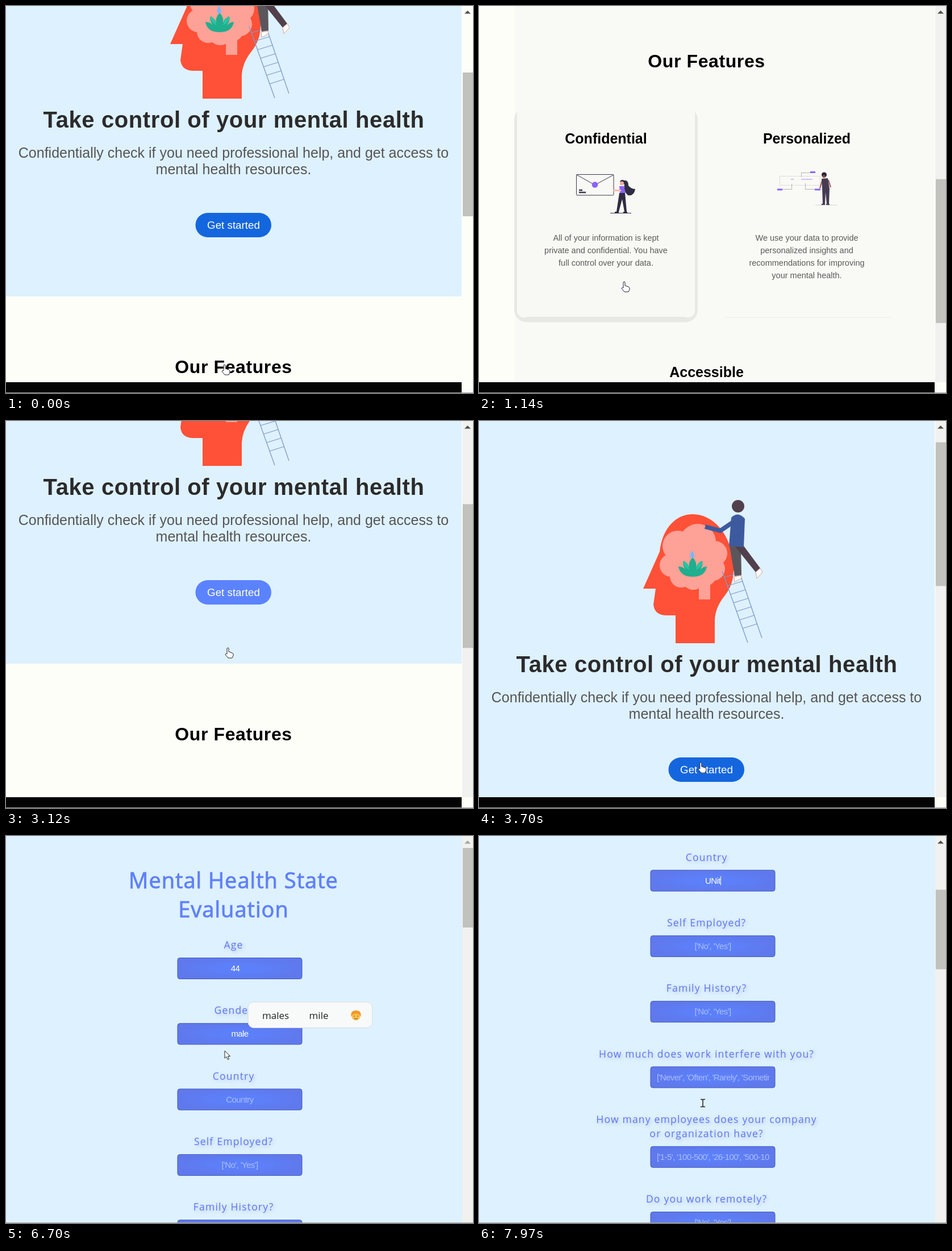
An HTML page that plays this animation: 822x681 px, repeating every 8000 ms.

```html
<!DOCTYPE html>
<html lang="en">
<head>
<meta charset="utf-8">
<style>
  html, body { margin: 0; width: 100%; height: 100%; overflow: hidden; background: #fefef9; }
  svg { display: block; }
  text { font-family: "Liberation Sans", Arial, sans-serif; text-anchor: middle; white-space: pre; }
  .title { font-weight: bold; letter-spacing: .6px; }
  .name { font: bold 25px "Liberation Sans", Arial, sans-serif; }
  .copy { font-size: 14.5px; fill: #5a5a5a; }
  .open { font-family: "Open Sans", sans-serif; }
  .head { font-size: 38px; letter-spacing: 1px; fill: #5f80fa; stroke: #5f80fa; stroke-width: .9px; }
  .label { font-size: 17.5px; letter-spacing: 1.2px; fill: #6274f0; filter: drop-shadow(2px 2px 3px #4466aa55); }
  .entry { font-size: 15px; letter-spacing: -.6px; }
</style>
</head>
<body>
<svg id="stage" width="822" height="681" viewBox="0 0 822 681">
  <defs>
    <radialGradient id="field"><stop offset=".3" stop-color="#5c80fa"/><stop offset="1" stop-color="#5f79ec"/></radialGradient>
  </defs>

  <g id="home">
    <rect width="822" height="681" fill="#fefef9"/>
    <rect id="shade" x="63" width="739" height="662" fill="#f9f9f5"/>
    <g id="homePage">
      <rect y="-278" width="802" height="789" fill="#def1ff"/>
      <path fill="#ff5137" d="M289 67L318 2C330-100 448-80 448 35Q448 60 432 80Q416 100 415 122V163H346V114H330Q309 114 307 95L311 67Z"/>
      <g fill="#fea197">
        <circle cx="338" cy="26" r="20"/><circle cx="350" cy="-8" r="27"/><circle cx="385" cy="-15" r="32"/>
        <circle cx="415" cy="5" r="22"/><circle cx="412" cy="32" r="21"/><circle cx="356" cy="45" r="20"/>
        <circle cx="377" cy="48" r="21"/><circle cx="397" cy="42" r="21"/><rect x="387" y="50" width="20" height="36"/>
        <rect x="340" y="-20" width="75" height="66"/>
      </g>
      <path fill="#1fae8e" d="M351 28Q360 28 364 34Q357 24 360 18Q368 22 370 30Q368 20 376 12Q384 20 382 30Q385 21 393 18Q395 25 389 34Q394 28 401 28Q398 46 376 46Q354 46 351 28Z"/>
      <path fill="#22c9a6" d="M360 18Q368 22 370 34Q359 28 360 18ZM393 18Q385 22 382 34Q394 28 393 18Z"/>
      <path fill="#79b8ff" d="M375 0Q383 12 375 13Q368 12 375 0Z"/>
      <g id="ladder" fill="none" stroke="#7d9aca" stroke-width="1.3"></g>
      <path fill="#5b565c" d="M441-8L461-8L462 43L450 45Z"/>
      <path fill="#51404c" d="M450-8L466-8L495 31L487 38Z"/>
      <path fill="#fff" stroke="#d9a08c" d="M449 46L462 44Q464 50 450 55ZM487 38L495 31L499 38L489 49Z"/>
      <path fill="#3d5a9e" d="M440-8L444-58Q456-70 468-56L466-6Z"/>
      <path fill="none" stroke="#3d5a9e" stroke-width="8" d="M450-52L425-35L398-42"/>
      <circle cx="456" cy="-78" r="11" fill="#51404c"/>

      <text class="title" x="401" y="214" font-size="40" fill="#2b2b2b">Take control of your mental health</text>
      <g font-size="25" fill="#555">
        <text x="400.5" y="267">Confidentially check if you need professional help, and get access to</text>
        <text x="400.5" y="296">mental health resources.</text>
      </g>
      <rect id="button" x="333.5" y="364" width="133.5" height="43" rx="21.5"/>
      <text x="400.5" y="392" font-size="18.75" fill="#fff">Get started</text>
      <text class="title" x="400.5" y="646" font-size="32">Our Features</text>

      <g transform="translate(0 538)">
        <path stroke="#ededE6" d="M77 548H367M433 548H725"/>
        <g id="hover">
          <rect x="62" y="178" width="323" height="378.5" rx="22" fill="#e8e8e6"/>
          <rect x="67" y="177" width="313" height="371" rx="12" fill="#f8f8f4"/>
          <path stroke="#dfe0d4" d="M84 548H364"/>
        </g>
        <text class="name" x="223.5" y="242">Confidential</text>
        <text class="name" x="577" y="242">Personalized</text>
        <text class="name" x="400.5" y="653">Accessible</text>
        <g id="copies"></g>

        <g stroke="#3a3750">
          <rect x="171.5" y="296.500" width="65.500" height="36.500" rx="1.500" fill="none"/>
          <path fill="none" d="M172 297L204 315L237 297M231 364.500H268"/>
          <path stroke-width="2.500" d="M176 324H182M176 328H188"/>
        </g>
        <circle cx="204" cy="314.500" r="5.300" fill="#8a63f7"/>
        <path fill="#2f2c42" d="M248 309Q250 304 256 307Q263 306 263 316Q268 322 275 322Q273 335 262 333Q254 326 256 314Z"/>
        <circle cx="251.500" cy="312" r="3.500" fill="#f3a9a0"/>
        <path fill="#8a63f7" d="M247 317H255L258 329H248Z"/>
        <path stroke="#ffb9ae" stroke-width="3" d="M236 324.500H250"/>
        <path fill="#2f2c42" d="M247 329H257L260 362H256L252 340L246 362H242ZM239 362H246V364.500H239ZM254 362H261V364.500H254Z"/>

        <rect x="529.500" y="299.500" width="71" height="16" fill="none" stroke="#dededc"/>
        <path fill="none" stroke="#b3b3b8" d="M567.500 301V293.500H583M550.500 313V322.500H534M574.500 312V322.500H591"/>
        <path stroke="#8a63f7" stroke-width="3" d="M583 292.500H592M525 323H534M591 323H601"/>
        <path stroke="#a78cf8" d="M549 305H554M567 305H587"/>
        <circle cx="607.500" cy="297" r="4.500" fill="#2f2437"/><circle cx="607" cy="300" r="2.500" fill="#8d4f4b"/>
        <path fill="none" stroke="#9a5b58" stroke-width="2" d="M604 307L600 321M615 306L619 319"/>
        <path fill="#453c52" d="M603 304L614 303L617 322L616 348H612L610 328L609 348H605L604 320ZM603 348H609V350H603ZM611 348H617V350H611Z"/>
        <path stroke="#d5d5d5" d="M592 350.500H630"/>

        <g transform="translate(0 242)" stroke-linejoin="round">
          <path fill="none" stroke="#7168a8" stroke-width="11" d="M374 497L360 483Q345 460 363 446Q378 438 394 448"/>
          <path fill="none" stroke="#b9a9f2" stroke-width="9" d="M374 497L360 483Q345 460 363 446Q378 438 393 447"/>
          <path fill="none" stroke="#e9e3ff" stroke-width="2" d="M365 444Q374 439 384 442"/>
          <path fill="#f7ce5b" stroke="#a08a44" d="M373 498L364 507L390 532Q409 547 430 538L440 528Z"/>
          <path fill="#f3e689" stroke="#8f8448" d="M416 454L446 483Q456 497 449 512Q441 532 420 534Q409 534 400 526L371 500Z"/>
          <path fill="none" stroke="#d9b54a" d="M416 460L442 485Q452 497 445 511Q437 528 420 530Q411 530 402 522L376 500Z"/>
          <circle cx="413" cy="497" r="6" fill="#33355e"/>
          <path stroke="#33355e" stroke-width="5" d="M413 497L426 506"/>
          <path stroke="#9a8be0" stroke-width="5" d="M412 499L423 508"/>
        </g>
      </g>
    </g>
    <rect y="662" width="802" height="18" fill="#040404"/>
  </g>

  <g id="form">
    <rect width="822" height="681" fill="#def1ff"/>
    <g id="formPage">
      <text class="open head" x="400.500" y="92">Mental Health State</text>
      <text class="open head" x="400.500" y="143">Evaluation</text>
      <g id="fields"></g>
      <g id="spinner">
        <rect x="494" y="225" width="16" height="16" fill="#f2f2f2"/>
        <path fill="#444" d="M498 231.500L502 227L506 231.500ZM498 235L502 239.500L506 235Z"/>
      </g>
    </g>
    <g id="tooltip">
      <path fill="#fff" stroke="#666" d="M396.500 292V259.500H574.500V292"/>
      <text class="open" x="485" y="282" font-size="14.800" fill="#444">Please fill out this field.</text>
    </g>
    <g id="suggest">
      <rect x="426" y="292" width="219" height="45.500" rx="10" fill="#f8f9f9" stroke="#d3dde4"/>
      <g font-size="17" fill="#222">
        <text class="open" x="474.500" y="322">males</text><text class="open" x="550.500" y="322">mile</text>
      </g>
      <circle cx="616" cy="317" r="7.500" fill="#fbc04c"/>
      <path fill="#f2982e" d="M607.500 318Q606 307 616 307Q626 307 624.500 318Q621 312 616 313Q611 312 607.500 318Z"/>
      <path fill="none" stroke="#7a4a1c" d="M613 316V318M619 316V318M613 321Q616 323 619 321"/>
    </g>
  </g>

  <g>
    <rect id="track" x="803" width="19" fill="#f1f1ef"/>
    <path id="arrow" d="M807 13.500L812.500 8L818 13.500Z"/>
    <rect id="thumb" x="804" width="18" fill="#c1c1bd"/>
    <path stroke="#a5a5a5" d="M0 680.500H822"/>
  </g>

  <g id="pointer">
    <path id="hand" fill="#fff" stroke="#223" d="M-4-8Q-2-10-1-8V-2L5 0Q8 1 7 5L5 9H-2L-7 3Q-6 0-4 2Z"/>
    <path id="arrowhead" fill="#fff" stroke="#222" d="M0 0V13L3 10.500L5.500 15.500L7.500 14.500L5.500 9.500H9.500Z"/>
    <path id="beam" fill="none" stroke-width="1.500" d="M-4-6.500H-1L0-5.500L1-6.500H4M-4 6.500H-1L0 5.500L1 6.500H4M0-6V6"/>
  </g>
</svg>

<script>
const $ = id => document.getElementById(id);
const set = (id, name, value) => $(id).setAttribute(name, value);
const show = (id, on) => set(id, 'display', on ? 'inline' : 'none');
const shift = (id, x, y) => set(id, 'transform', `translate(${x} ${y})`);

$('ladder').innerHTML = '<path d="M428 36L473 162M459 40L498 154"/>' +
  [0, 1, 2, 3, 4, 5, 6].map(i => {
    const y = 47 + 15 * i;
    return `<path d="M${428 + (y - 36) * .357} ${y}L${459 + (y - 48) * .342} ${y - 8}"/>`;
  }).join('');

const copies = [
  [223.5, 413, 'All of your information is kept', 'private and confidential. You have', 'full control over your data.'],
  [577, 413, 'We use your data to provide', 'personalized insights and', 'recommendations for improving', 'your mental health.'],
  [400.5, 824, 'Our service is accessible 24/7 from', 'any device. Get the help you need,', 'when you need it.']
];
$('copies').innerHTML = copies.map(([x, y, ...lines]) =>
  lines.map((s, i) => `<text class="copy" x="${x}" y="${y + 22 * i}">${s}</text>`).join('')).join('');

const yesNo = "['No', 'Yes']";
const fields = [
  ['Age', 'Age'], ['Gender', 'Gender'], ['Country', 'Country'], ['Self Employed?', yesNo], ['Family History?', yesNo],
  ['How much does work interfere with you?', "['Never', 'Often', 'Rarely', 'Sometimes']"],
  ['How many employees does your company|or organization have?', "['1-5', '100-500', '26-100', '500-1000']"],
  ['Do you work remotely?', yesNo]
];
$('fields').innerHTML = fields.map(([label, hint], i) => {
  const top = 198 + 115.3 * i + (i > 6 ? 25 : 0);
  const lines = label.split('|');
  const box = top + 16 + 25 * (lines.length - 1);
  const place = hint.length > 20 ? 'x="0" style="text-anchor:start"' : `x="${i ? 98.5 : 90.5}"`;
  return lines.map((s, n) => `<text class="open label" x="400.6" y="${top + 25 * n}">${s}</text>`).join('') +
    `<rect x="302" y="${box + .5}" width="219" height="37" rx="4" fill="url(#field)" stroke="#4059bd"/>
     <svg x="313" y="${box}" width="198" height="38">
       <text class="entry" id="entry${i}" ${place} y="24" fill="#aabdfb">${hint}</text>
       <path id="caret${i}" stroke="#fff" display="none"/>
     </svg>`;
}).join('');

// Smooth interpolation through [time, ...values] keys
function at(keys, t) {
  const n = keys.findIndex(k => k[0] > t);
  if (n < 0) return keys.at(-1).slice(1);
  if (!n) return keys[0].slice(1);
  const [a, b] = [keys[n - 1], keys[n]];
  const u = (t - a[0]) / (b[0] - a[0]);
  const e = u * u * (3 - 2 * u);
  return a.slice(1).map((v, i) => v + (b[i + 1] - v) * e);
}

const homeScroll = [[60, 278], [860, 816], [2180, 816], [2380, 1058], [2900, 1058], [3120, 362], [3200, 362], [3480, 50]];
const formScroll = [[7580, 0], [7960, 385]];
const path = [
  [560, 387, 640], [880, 345, 572], [1140, 258, 494], [1220, 258, 494], [1330, 180, 330], [1430, 240, 240],
  [1560, 630, 310], [1720, 500, 485], [1800, 500, 485], [2060, 587, 402], [2660, 587, 402], [2800, 393, 408],
  [3280, 393, 408], [3620, 393, 610], [4220, 390, 612], [4600, 385, 239], [5480, 385, 239], [5870, 387, 347],
  [6460, 387, 347], [6700, 385, 378], [6780, 385, 378], [7020, 394, 470]
];
const typing = [[0, '44', [5100, 5200]], [1, 'male', [6120, 6200, 6290, 6370]], [2, 'UNit', [7200, 7280, 7420, 7520]]];

function type(t) {
  for (const [i, word, times] of typing) {
    const text = word.slice(0, times.filter(k => k <= t).length);
    const entry = $('entry' + i);
    entry.textContent = text || fields[i][1];
    entry.setAttribute('fill', text ? '#fff' : '#aabdfb');
    show('caret' + i, text && i === 2);
    if (text) set('caret' + i, 'd', `M${98.5 + entry.getComputedTextLength() / 2 + .5} 11V27`);
  }
}

function draw(t) {
  const onHome = t < 3780;
  const [scroll] = at(onHome ? homeScroll : formScroll, t);
  const [x, y] = at(path, t);
  show('home', onHome);
  show('form', !onHome);

  if (onHome) {
    shift('homePage', 0, 278 - scroll);
    show('shade', t >= 880 && t < 2960);
    show('hover', t >= 880 && t < 2720);
    shift('hover', t < 1500 ? 0 : 353.5, 0);
    set('button', 'fill', t < 880 || t > 3580 ? '#1466de' : '#5c83ff');
  } else {
    shift('formPage', 0, -scroll);
    type(t);
    show('spinner', t >= 4500 && t < 5530);
    show('tooltip', t >= 4560 && t < 4770);
    show('suggest', t >= 6200 && t < 6780);
  }

  set('track', 'height', onHome ? 662 : 680);
  show('track', t >= 80);
  set('thumb', 'y', onHome ? 20 + scroll * .349 : 21 + scroll * .191);
  set('thumb', 'height', onHome ? 253 : 140);
  set('arrow', 'fill', scroll ? '#505050' : '#a3a3a3');

  const beam = t >= 4520 && t < 6600 || t >= 6960;
  shift('pointer', x, y);
  show('pointer', !(t >= 5100 && t < 5530 || t >= 6120 && t < 6700));
  show('hand', onHome);
  show('arrowhead', !onHome && !beam);
  show('beam', !onHome && beam);
  set('beam', 'stroke', t < 6700 ? '#9c8546' : '#222');
}

function tick(now) {
  draw(now % 8000);
  requestAnimationFrame(tick);
}
draw(0);
requestAnimationFrame(tick);
</script>
</body>
</html>
```
